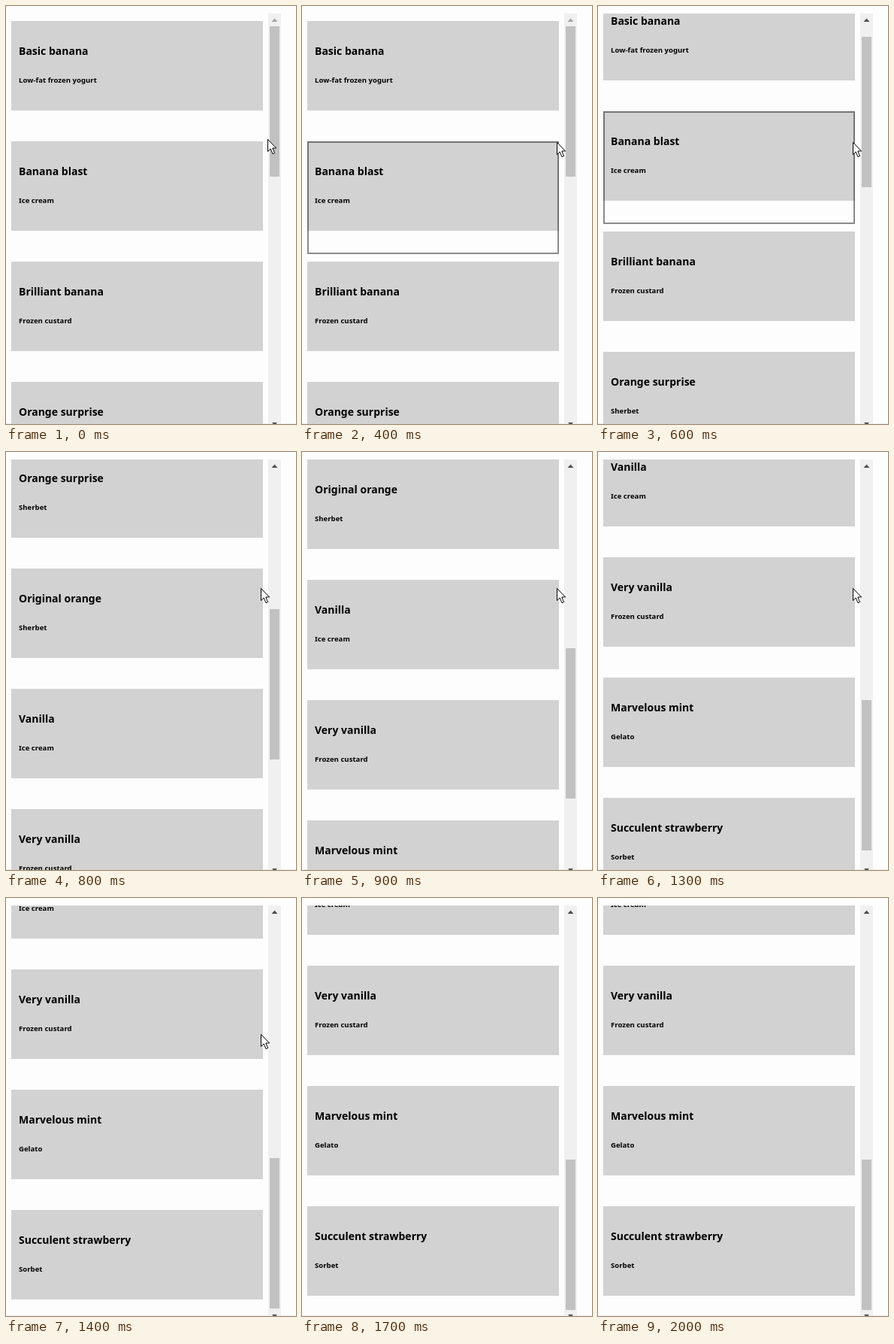
These frames come from a looping animation (386x556 px, 2400 ms). An HTML page:

```html
<!DOCTYPE html>
<html lang="en">
<head>
<meta charset="utf-8">
<title>Scrolling list</title>
<style>
  html, body { margin: 0; width: 100%; height: 100%; overflow: hidden; background: #fdfdfd; }
  svg { display: block; }
  text { font-family: "Noto Sans", "Open Sans", sans-serif; font-weight: 700; fill: #000; }
  .title { font-size: 14px; }
  .kind { font-size: 9.6px; }
</style>
</head>
<body>
<svg width="386" height="556" viewBox="0 0 386 556">
  <clipPath id="view"><rect x="0" y="10" width="348" height="546"/></clipPath>
  <rect y="555" width="386" height="1" fill="#eee"/>
  <g clip-path="url(#view)">
    <g id="list"></g>
  </g>
  <rect x="349" y="10" width="17" height="546" fill="#f0f0f0"/>
  <path id="up" d="M353.5 21L357.5 16.5L361.5 21Z"/>
  <path d="M354 554h7l-3.5 4z" fill="#505050"/>
  <rect id="thumb" x="351" y="27" width="13" height="200" fill="#c1c1c1"/>
  <path id="cursor" d="M.5 .5V16.5L4.2 13L7 19.7L9.6 18.6L6.8 12H11.6Z" fill="#fff" stroke="#000"/>
</svg>
<script>
const LOOP = 2400, PITCH = 160, RATIO = 0.361;

const items = [
  ["Basic banana", "Low-fat frozen yogurt"],
  ["Banana blast", "Ice cream"],
  ["Brilliant banana", "Frozen custard"],
  ["Orange surprise", "Sherbet"],
  ["Original orange", "Sherbet"],
  ["Vanilla", "Ice cream"],
  ["Very vanilla", "Frozen custard"],
  ["Marvelous mint", "Gelato"],
  ["Succulent strawberry", "Sorbet"]
];

// [start ms, value]; each value holds until the next step
const scrollSteps = [
  [0, 0], [600, 40], [700, 265], [800, 505], [900, 650], [1000, 755],
  [1100, 800], [1300, 840], [1400, 885], [1500, 890]
];
const cursorSteps = [
  [0, [348, 177]], [100, [344, 179]], [200, [340, 181]], [300, [339, 181]], [1700, null]
];
const hoverSteps = [[0, false], [200, true], [800, false]];

const $ = id => document.getElementById(id);
const list = $("list"), thumb = $("thumb"), cursor = $("cursor"), up = $("up");

function add(tag, attrs, text = "") {
  const el = document.createElementNS("http://www.w3.org/2000/svg", tag);
  for (const key in attrs) el.setAttribute(key, attrs[key]);
  el.textContent = text;
  return list.appendChild(el);
}

items.forEach(([title, kind], i) => {
  const y = 20 + i * PITCH;
  add("rect", { x: 7, y, width: 335, height: 119, fill: "#d2d2d2" });
  add("text", { x: 17, y: y + 45, class: "title" }, title);
  add("text", { x: 17, y: y + 82, class: "kind" }, kind);
});

const outline = add("rect", {
  x: 8, y: 21 + PITCH, width: 333, height: 148,
  fill: "none", stroke: "#000", "stroke-opacity": 0.45, "stroke-width": 2
});

function at(steps, t) {
  let value = steps[0][1];
  for (const [start, next] of steps) if (t >= start) value = next;
  return value;
}

function draw(now) {
  const t = now % LOOP;
  const top = at(scrollSteps, t);
  const pos = at(cursorSteps, t);
  list.setAttribute("transform", `translate(0 ${-top})`);
  thumb.setAttribute("y", 27 + Math.floor(top * RATIO));
  up.setAttribute("fill", top ? "#505050" : "#a3a3a3");
  outline.setAttribute("visibility", at(hoverSteps, t) ? "visible" : "hidden");
  cursor.setAttribute("visibility", pos ? "visible" : "hidden");
  if (pos) cursor.setAttribute("transform", `translate(${pos})`);
}

function tick() {
  draw(performance.now());
  requestAnimationFrame(tick);
}
tick();
</script>
</body>
</html>
```
